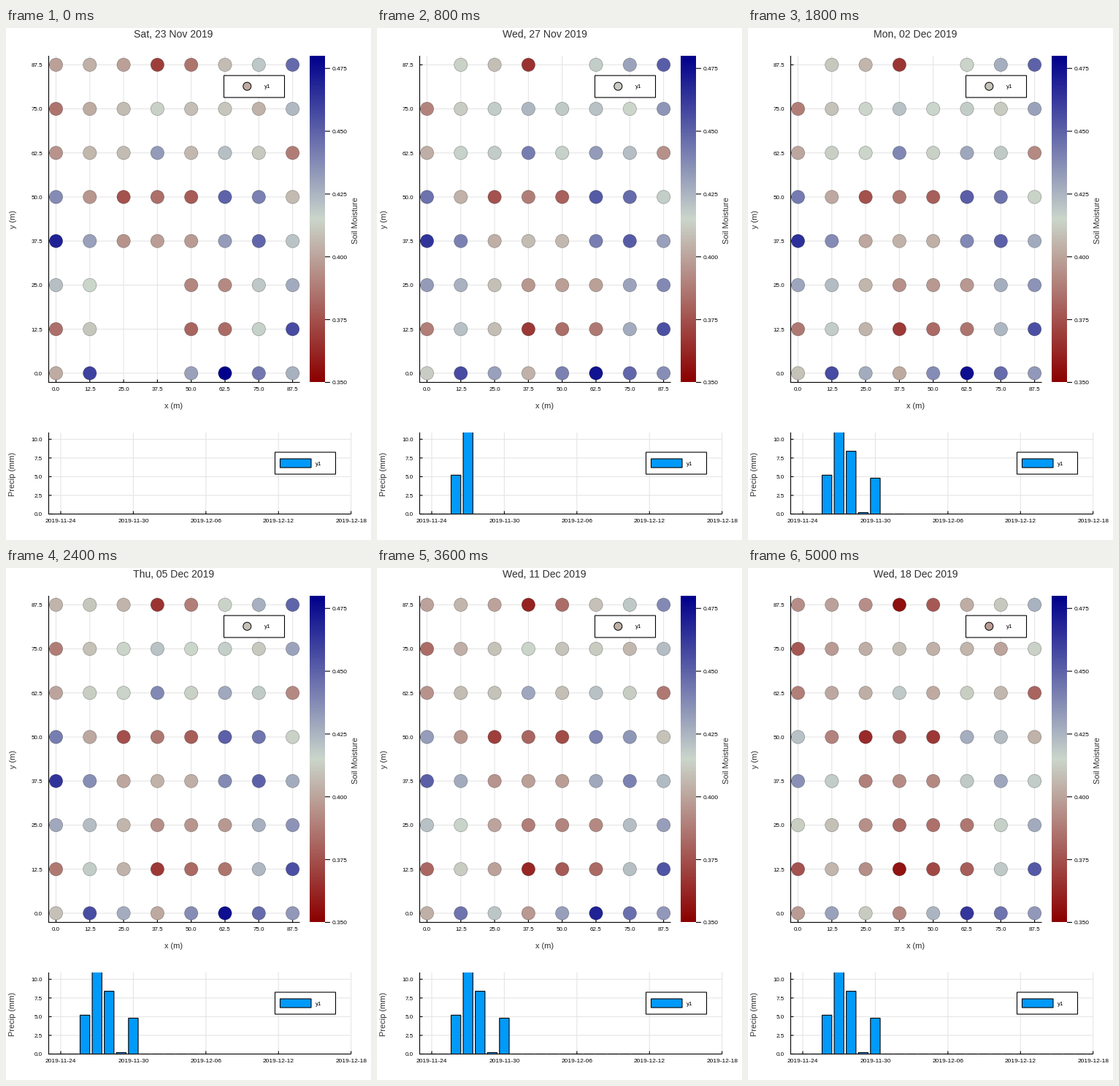
A matplotlib script for the animation above (5200 ms loop, 500 px wide and 700 px high).

```python
import numpy as np
import matplotlib.pyplot as plt
from matplotlib.animation import FuncAnimation
from matplotlib.colors import LinearSegmentedColormap
from matplotlib.patches import Circle, Rectangle

W, H, DPI = 500, 700, 100
DAYS, STEP = 26, 200
PX = 72 / DPI
INK = "#303030"
plt.rcParams["font.family"] = "Liberation Sans"
plt.rcParams["path.snap"] = False

# Notable dry and wet spots, (column, row): soil moisture in thousandths
SPOTS = {(0, 1): 385, (3, 0): 369, (7, 0): 448, (3, 2): 433, (7, 2): 388,
         (2, 3): 375, (4, 3): 378, (5, 3): 450, (0, 4): 470, (6, 4): 449,
         (0, 6): 384, (3, 6): 370, (5, 6): 383, (7, 6): 457, (0, 7): 402,
         (1, 7): 460, (5, 7): 480}
RAIN = {3: 5.2, 4: 12, 5: 8.4, 6: 0.2, 7: 4.8}

CMAP = LinearSegmentedColormap.from_list(
    "soil", ["#8b0000", "#cbd6cb", "#00008b"], N=512)

row, col = np.mgrid[:8, :8]


def kernel(a, b):
    gap = a[:, None, :] - b[None, :, :]
    return np.exp(-(gap ** 2).sum(axis=2))


def initial_field():
    """Mild random background, bent smoothly through the spots."""
    cells = np.column_stack([col.ravel(), row.ravel()])
    spots = np.array(list(SPOTS))
    base = np.random.default_rng(4).normal(407, 4, (8, 8))
    offset = np.array(list(SPOTS.values())) - base[spots[:, 1], spots[:, 0]]
    weights = np.linalg.solve(kernel(spots, spots), offset)
    return base + (kernel(cells, spots) @ weights).reshape(8, 8)


START = initial_field()
# Medium-wet soil takes up most rain; wet soil loses most, except low right.
GAIN = np.clip(8 * (1 - ((START - 415) / 40) ** 2), -4, 8)
WET = START + GAIN
SHELTER = np.clip((13.5 - col - row) / 4, 0, 1)
LOSS = (12 + 0.35 * np.clip(WET - 415, 0, None)) * SHELTER


def moisture(day):
    wet = np.interp(day, [2, 3, 4, 7], [0, 0.6, 1.4, 1])
    dry = np.interp(day, [7, 12, 16, 25], [0, 0.05, 0.35, 1])
    return START + wet * GAIN - dry * LOSS


def reporting(day):
    ok = np.ones((8, 8), bool)
    if day < 3:
        ok[5:, 2:4] = False
    if 3 <= day < 10:
        ok[0, [0, 4]] = False
    return ok


def color(v):
    return CMAP((v - 350) / 130)


def title_for(day):
    name = ["Sat", "Sun", "Mon", "Tue", "Wed", "Thu", "Fri"][day % 7]
    date, month = (23 + day, "Nov") if day < 8 else (day - 7, "Dec")
    return f"{name}, {date:02d} {month} 2019"


fig = plt.figure(figsize=(W / DPI, H / DPI), dpi=DPI, facecolor="white")
ax = fig.add_axes([0, 0, 1, 1])
ax.axis("off")


def line(x0, y0, x1, y1, c="black", z=2):
    ax.plot([x0, x1], [y0, y1], color=c, lw=1.1 * PX, zorder=z,
            solid_capstyle="butt")


def text(x, y, s, size=8, ha="center", c="black"):
    return ax.text(x, y + 0.36 * size, s, fontsize=size * PX, ha=ha,
                   va="baseline", color=c, zorder=8)


def side_text(x, y, s):
    ax.text(x, y, s, fontsize=11 * PX, rotation=90, ha="center", va="center",
            color=INK)


def box(x0, y0, x1, y1, fill, z):
    patch = Rectangle((x0, y0), x1 - x0, y1 - y0, fc=fill, ec="black",
                      lw=1.1 * PX, zorder=z)
    return ax.add_patch(patch)


def axes_frame(left, top, right, bottom, xticks, yticks, label_y):
    for x, s in xticks:
        line(x, top, x, bottom, "#e5e5e5", 1)
        line(x, bottom - 4, x, bottom)
        text(x, label_y, s, 8.4 if len(s) > 5 else 8)
    for y, s in yticks:
        line(left, y, right, y, "#e5e5e5", 1)
        line(left, y, left + 4, y)
        text(50, y, s, ha="right")
    line(left, top, left, bottom + 0.5)
    line(left - 0.5, bottom, right, bottom)


# Sensor map
xs = 68.5 + 46.3 * np.arange(8)
ys = 50.3 + 60.24 * np.arange(8)
names = [f"{12.5 * i:.1f}" for i in range(8)]
axes_frame(58.5, 38, 402.5, 484.5, list(zip(xs, names)),
           list(zip(ys, names[::-1])), 493)
text(229.5, 516.5, "x (m)", 11, c=INK)
side_text(10, 261.5, "y (m)")
title = text(229.5, 8, "", 14, c=INK)

points = np.column_stack([xs[col.ravel()], ys[row.ravel()]])
dots = ax.scatter(points[:, 0], points[:, 1], s=(18.3 * PX) ** 2, lw=0.4,
                  edgecolors=[(0, 0, 0, 0.4)], zorder=4)

box(298.5, 65, 381.5, 95, "white", 6)
key = ax.add_patch(Circle((330.3, 79.7), 5.5, ec="black", lw=PX, zorder=7))
text(358, 79.5, "y1")

# Colour scale
ax.imshow(np.linspace(1, 0, 446)[:, None], cmap=CMAP, aspect="auto",
          extent=(416, 437, 484, 38), zorder=2)
ax.set_xlim(0, W)
ax.set_ylim(H, 0)
for i in range(6):
    y = 484.5 - 85.85 * i
    line(437, y, 444, y)
    text(447, y, f"{0.35 + 0.025 * i:.3f}", 8.3, "left")
side_text(478.5, 263, "Soil Moisture")

# Rain chart
BASE, DAY_W, UNIT = 664.5, 16.57, 10.22
dates = ["2019-11-24", "2019-11-30", "2019-12-06", "2019-12-12", "2019-12-18"]
axes_frame(58.5, 553, 472.5, BASE,
           [(75 + 6 * DAY_W * i, s) for i, s in enumerate(dates)],
           [(BASE - 2.5 * UNIT * i, f"{2.5 * i:.1f}") for i in range(5)], 673)
side_text(9.5, 609.5, "Precip (mm)")

clip = Rectangle((58, 553), 414, 113, transform=ax.transData)
bars = []
for d in range(DAYS):
    mid = 75 + DAY_W * (d - 1)
    bar = box(mid - 0.4 * DAY_W, BASE - UNIT * RAIN.get(d, 0),
              mid + 0.4 * DAY_W, BASE, "#009afa", 3)
    bar.set_clip_path(clip)
    bars.append(bar)

box(368.5, 580, 451.5, 610, "white", 6)
box(375.5, 589, 418, 601, "#009afa", 7)
text(428, 595, "y1")


def draw(day):
    values, ok = moisture(day), reporting(day)
    title.set_text(title_for(day))
    dots.set_offsets(points[ok.ravel()])
    dots.set_facecolors(color(values[ok]))
    key.set_facecolor(color(values[7, 0]))
    for d, bar in enumerate(bars):
        bar.set_visible(d <= day)
    return [title, dots, key, *bars]


anim = FuncAnimation(fig, draw, frames=DAYS, interval=STEP, repeat=True,
                     repeat_delay=0, init_func=lambda: draw(0))
plt.show()
```
